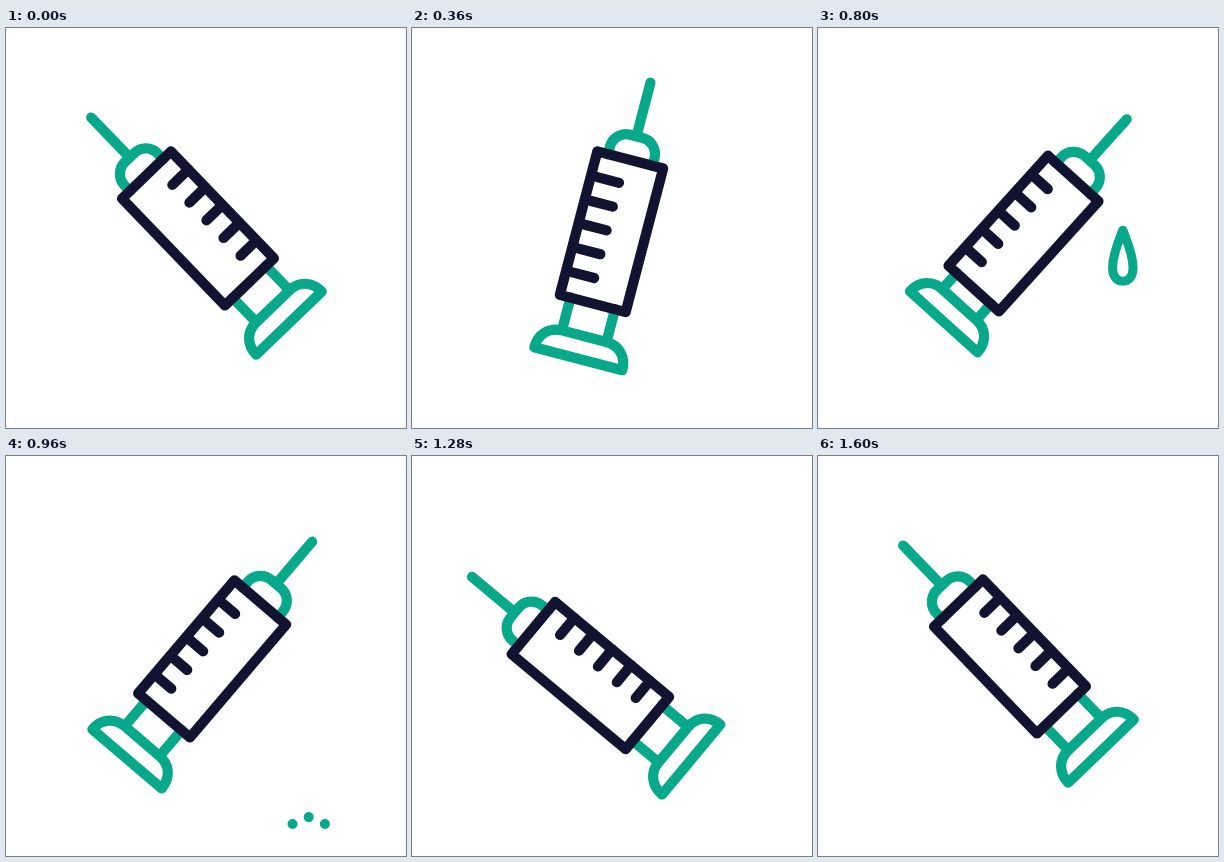
Write an HTML page with a canvas that moves like this. It is 400 px wide and 400 px high and loops after 1680 ms.

```html
<!DOCTYPE html>
<html lang="en">
<head>
<meta charset="utf-8">
<title>Syringe</title>
<style>
  html, body { margin: 0; width: 100%; height: 100%; overflow: hidden; background: #fff; }
  canvas { display: block; width: 400px; height: 400px; }
</style>
</head>
<body>
<canvas id="stage"></canvas>
<script>
const LOOP = 1680, STEP = 40;
const GREEN = '#08a88a', NAVY = '#121331';
const PIVOT = 10.6; // rotation centre, below the middle of the barrel

const canvas = document.getElementById('stage');
const ctx = canvas.getContext('2d');
const ratio = window.devicePixelRatio || 1;
canvas.width = canvas.height = 400 * ratio;

// Keys: time, then values
const ANGLE = [[0, -43.9], [140, -50.2], [490, 42.9], [600, 42.8], [800, 42.1], [930, 42.1], [1280, -50.2], [1600, -43.9]];
const PLACE = [
  [0, 199.3, 208.1],
  [140, 186.5, 226.3],
  [450, 199.3, 211],
  [600, 199.3, 211.3],
  [790, 198.4, 213.4],
  [960, 199.3, 211],
  [1280, 186.5, 226.3],
  [1600, 199.3, 208.1]
];
const TICKS = [[120, 23], [440, -23], [960, -23], [1280, 23]];
const PRESS = [[470, 0], [740, 17], [910, 0]];
const DROP = [[490, 0.05, 312], [560, 0.36, 312], [780, 1, 304.8]]; // scale, x
const LAND = 920, SPLASH_END = 1200;

const mix = (a, b, p) => a + (b - a) * p;
const ease = p => (1 - Math.cos(Math.PI * p)) / 2;

function sample(keys, t) {
  const next = keys.findIndex(key => key[0] > t);
  if (next === 0) return keys[0].slice(1);
  if (next < 0) return keys[keys.length - 1].slice(1);
  const a = keys[next - 1], b = keys[next];
  const p = ease((t - a[0]) / (b[0] - a[0]));
  return a.slice(1).map((value, i) => mix(value, b[i + 1], p));
}

function stroke(color, path) {
  ctx.strokeStyle = color;
  ctx.beginPath();
  path();
  ctx.stroke();
}

function line(x1, y1, x2, y2) {
  ctx.moveTo(x1, y1);
  ctx.lineTo(x2, y2);
}

function drawSyringe(t) {
  const [angle] = sample(ANGLE, t);
  const [x, y] = sample(PLACE, t);
  const [tickX] = sample(TICKS, t);
  const [press] = sample(PRESS, t);
  const top = 108 - press, bottom = 131.3 - press;

  ctx.save();
  ctx.translate(x, y);
  ctx.rotate(angle * Math.PI / 180);
  ctx.translate(0, -PIVOT);
  ctx.lineWidth = 10.2;

  stroke(GREEN, () => { // needle, hub and plunger
    line(0, -154, 0, -100);
    ctx.moveTo(-23, -74);
    ctx.arcTo(-23, -98.5, 0, -98.5, 16.5);
    ctx.arcTo(23, -98.5, 23, -74, 16.5);
    ctx.lineTo(23, -74);
    line(-23, 74, -23, top);
    line(23, 74, 23, top);
    ctx.moveTo(-45.5, bottom);
    ctx.bezierCurveTo(-45.5, bottom - 14, -36, top, -23, top);
    ctx.lineTo(23, top);
    ctx.bezierCurveTo(36, top, 45.5, bottom - 14, 45.5, bottom);
    ctx.closePath();
  });

  stroke(NAVY, () => {
    ctx.rect(-34, -74.2, 68, 148.4);
    for (let i = -2; i <= 2; i++) {
      line(tickX - 11.2, i * 24.6, tickX + 11.2, i * 24.6);
    }
  });
  ctx.restore();
}

function drawDrop(t) {
  if (t < 500 || t >= LAND) return;
  const [size, x] = sample(DROP, t);
  const fall = Math.max(0, t - 560);
  const y = 91 + 0.00193 * fall * fall;
  const w = 10.2 * size, h = 51 * size;

  ctx.lineWidth = 9;
  stroke(GREEN, () => {
    ctx.moveTo(x, y);
    ctx.bezierCurveTo(x - w * 0.3, y + h * 0.16, x - w, y + h * 0.47, x - w, y + h * 0.73);
    ctx.bezierCurveTo(x - w, y + h * 0.92, x - w * 0.57, y + h, x, y + h);
    ctx.bezierCurveTo(x + w * 0.57, y + h, x + w, y + h * 0.92, x + w, y + h * 0.73);
    ctx.bezierCurveTo(x + w, y + h * 0.47, x + w * 0.3, y + h * 0.16, x, y);
    ctx.closePath();
  });
}

function drawSplash(t) {
  if (t < LAND || t >= SPLASH_END) return;
  const q = (t - LAND) / (SPLASH_END - LAND);
  const spread = 1 - (1 - q) ** 2;
  const radius = 5 * Math.min(1, (1 - q) * 2.8);

  ctx.fillStyle = GREEN;
  for (const side of [-1, 0, 1]) {
    ctx.beginPath();
    ctx.arc(302.7 + side * 61 * spread, 385 - (side ? 64 : 90) * spread, radius, 0, Math.PI * 2);
    ctx.fill();
  }
}

function render(now) {
  const t = Math.min(1600, Math.floor((now % LOOP) / STEP) * STEP);
  ctx.setTransform(ratio, 0, 0, ratio, 0, 0);
  ctx.fillStyle = '#fff';
  ctx.fillRect(0, 0, 400, 400);
  ctx.lineCap = ctx.lineJoin = 'round';
  drawSyringe(t);
  drawDrop(t);
  drawSplash(t);
}

let start;
function tick(now) {
  start ??= now;
  render(now - start);
  requestAnimationFrame(tick);
}
render(0);
requestAnimationFrame(tick);
</script>
</body>
</html>
```
